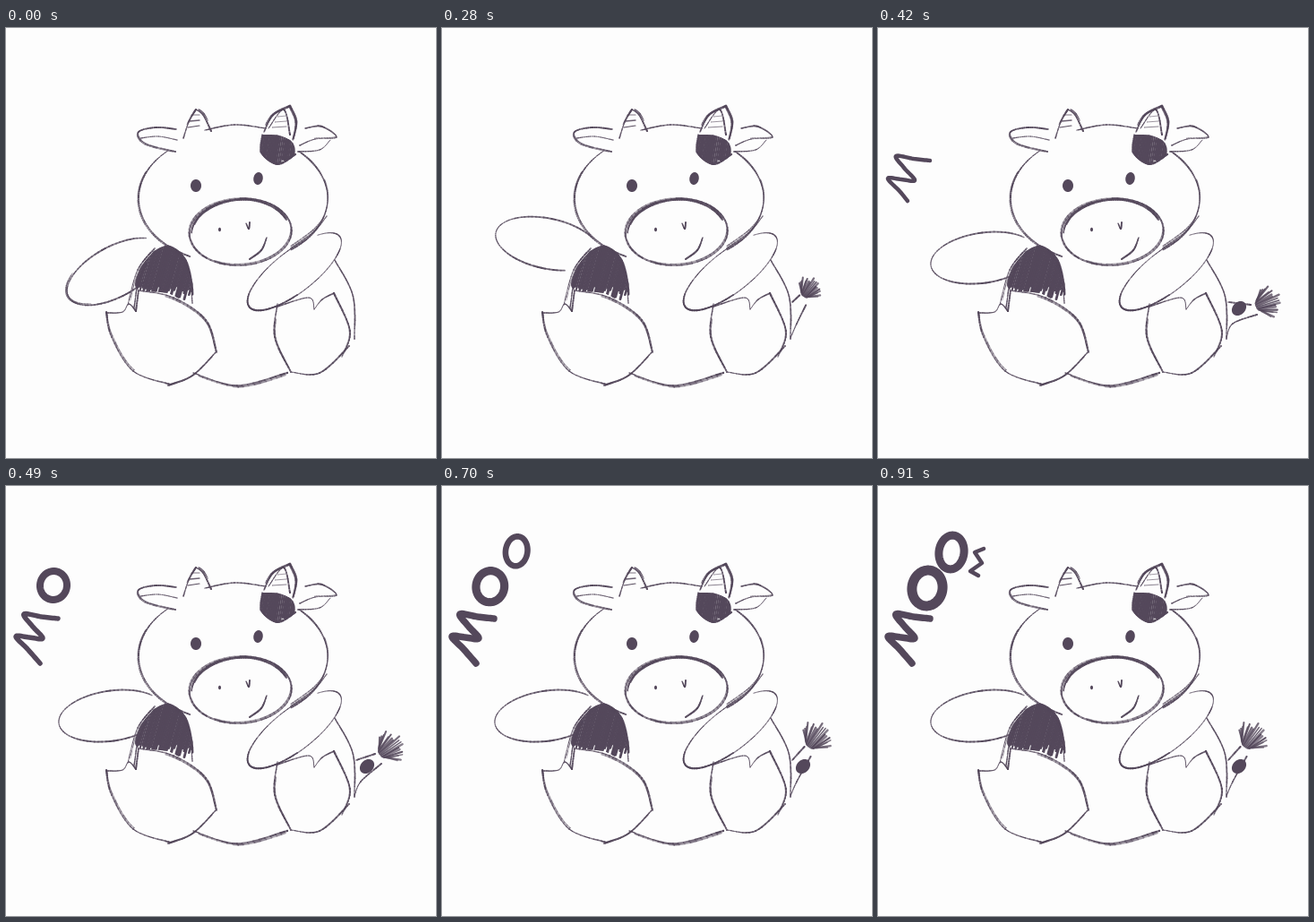
An HTML page with a canvas that plays this animation: 480x480 px, repeating every 0.98 s.

```html
<!DOCTYPE html>
<html lang="en">
<head>
<meta charset="utf-8">
<title>Cow doodle</title>
<style>
html, body { margin: 0; width: 100%; height: 100%; overflow: hidden; background: #fdfdfd; }
canvas { display: block; width: 480px; height: 480px; }
</style>
</head>
<body>
<canvas id="stage" width="480" height="480"></canvas>
<script>
const ctx = document.getElementById('stage').getContext('2d');
const STEP = 70, STEPS = 14, RAD = Math.PI / 180;
const PAPER = '#fdfdfd', INK = '#54485b';
ctx.lineCap = ctx.lineJoin = 'round';

let seed;
const random = () => (seed = seed * 16807 % 2147483647) / 2147483647;
const between = (a, b) => a + (b - a) * random();
const parse = s => s.split(' ').map(p => p.split(',').map(Number));

// Catmull-Rom samples through a few key points
function spline(path) {
  const pts = parse(path), out = [];
  const at = i => pts[Math.max(0, Math.min(pts.length - 1, i))];
  for (let i = 0; i < pts.length - 1; i++) {
    const [a, b, c, d] = [at(i - 1), at(i), at(i + 1), at(i + 2)];
    for (let t = 0; t < 1; t += 1 / 10) {
      out.push([0, 1].map(k => b[k] + t / 2 * (c[k] - a[k] +
        t * (2 * a[k] - 5 * b[k] + 4 * c[k] - d[k] + t * (3 * (b[k] - c[k]) + d[k] - a[k])))));
    }
  }
  return [...out, at(pts.length)];
}

// Samples along a tilted ellipse, angles in degrees
function arc(x, y, rx, ry, tilt = 0, from = 0, to = 360) {
  const c = Math.cos(tilt * RAD), s = Math.sin(tilt * RAD);
  return Array.from({ length: 61 }, (_, i) => {
    const a = (from + (to - from) * i / 60) * RAD;
    const u = rx * Math.cos(a), v = ry * Math.sin(a);
    return [x + u * c - v * s, y + u * s + v * c];
  });
}

// Grainy pencil line; each further pass retraces a stretch of it, a little off
function pencil(path, width = 1.5, passes = 2) {
  const pts = typeof path === 'string' ? spline(path) : path;
  ctx.strokeStyle = INK;
  for (let pass = 0; pass < passes; pass++) {
    const start = pass ? Math.floor(between(0, 0.4) * pts.length) : 0;
    const end = pass ? Math.floor(between(0.6, 1) * pts.length) : pts.length;
    const shift = pass ? [between(-1.6, 1.6), between(-1.6, 1.6)] : [0, 0];
    const phase = between(0, 6);
    for (let i = start + 1; i < end; i++) {
      ctx.globalAlpha = (pass ? 0.6 : 0.85) + between(-0.2, 0.15);
      ctx.lineWidth = width * (1 + 0.3 * Math.sin(phase + i * 0.15)) * (pass ? 0.8 : 1);
      ctx.beginPath();
      for (const [x, y] of [pts[i - 1], pts[i]]) ctx.lineTo(x + shift[0], y + shift[1]);
      ctx.stroke();
    }
  }
  ctx.globalAlpha = 1;
}

function trace(pts) {
  ctx.beginPath();
  pts.forEach(p => ctx.lineTo(...p));
}

function fill(pts, color = INK) {
  trace(pts);
  ctx.fillStyle = color;
  ctx.fill();
}

function marker(pts, width) {
  trace(pts);
  ctx.strokeStyle = INK;
  ctx.lineWidth = width;
  ctx.stroke();
}

// Shades a shape with slanted strokes that end unevenly towards the bottom
function shade(path, top, bottom, slant) {
  const pts = spline(path);
  const xs = pts.map(p => p[0]);
  const left = Math.min(...xs), right = Math.max(...xs);
  ctx.save();
  trace(pts);
  ctx.clip();
  for (let x = left; x < right + slant; x += 2) {
    const end = between(bottom - 18, bottom);
    marker([[x, top], [x - slant * (end - top) / (bottom - top), end]], between(2, 3.4));
  }
  ctx.restore();
}

function drawHead() {
  // ears
  pencil('190,113 168,111 148,116 156,129 189,138');
  pencil('150,123 170,121 191,125', 1.2, 1);
  pencil('334,112 352,110 369,122 345,124 328,131', 1.2);
  pencil('362,125 350,136 326,138', 1.2, 1);
  // horns
  pencil('198,123 204,105 212,91', 1.8);
  pencil('212,91 220,97 229,115');
  pencil('288,116 298,97 317,87', 2);
  pencil('317,87 324,104 321,123', 2);
  pencil('293,112 310,91 317,119');
  for (let i = 0; i < 3; i++) {
    pencil([[207 - i * 2, 97 + i * 7], [216, 97 + i * 6]], 1, 1);
    pencil([[303 - i * 3, 99 + i * 6], [313, 98 + i * 6]], 1, 1);
  }
  // spot
  shade('286,119 305,120 320,128 321,143 302,151 285,140 286,119', 114, 163, 8);
  pencil('286,119 285,139 303,152 323,141', 1.8);
  // outline
  pencil('222,114 255,108 290,112', 1.2, 1);
  pencil(arc(253, 190, 105, 73, 0, 226, 117));
  pencil(arc(253, 190, 106, 73, 0, -45, 52));
  // face
  fill(arc(212, 176, 6, 7));
  fill(arc(281.5, 168, 5.2, 7, 10));
  pencil(arc(262, 228, 57, 37, -3, 170, 530), 1.8);
  pencil(arc(262, 229, 55, 37, -3, 185, 340), 2);
  fill(arc(238.5, 225, 1.5, 2.2));
  pencil('268,218 271,224 272,217', 1.4, 1);
  pencil('291,234 285,248 272,258', 1.6, 1);
}

function drawBody() {
  // spot
  shade('165,249 183,243 203,262 208,306 180,296 146,291 150,268 165,249', 240, 306, 18);
  pencil('166,246 147,270 136,309');
  pencil('157,263 148,283 143,312');
  pencil('191,250 204,270 208,307');
  // near leg
  pencil('112,317 118,345 142,383 184,398', 1.7);
  pencil('181,399 208,388 235,361', 1.8);
  pencil('235,362 223,326 187,301 148,293', 1.7);
  pencil('148,293 145,316', 1.5, 1);
  pencil('145,316 137,308 130,317 112,318', 1.3, 1);
  // belly
  pencil('209,385 258,399 314,385', 1.8, 3);
  // far arm
  pencil(arc(322, 272, 64, 23, -38, 30, 300), 1.5, 3);
  pencil(arc(322, 272, 64, 23, -38, -45, 40), 1, 1);
  pencil('318,246 344,227 358,210', 1.5);
  // back and far leg
  pencil('367,259 387,298 389,347');
  pencil('303,308 300,345 318,384', 1.5);
  pencil('318,384 350,385 383,355', 1.4);
  pencil('375,367 384,338 366,296', 1.8);
  pencil('366,296 353,303 344,314', 1.3, 1);
  pencil('344,314 338,301 303,311', 1.3, 1);
}

// The arm waves up to the fourth step and settles halfway down
function drawArm(step) {
  const lift = Math.min(step, Math.max(2, 8 - step));
  const angle = -24 + 8.5 * lift;
  const x = 171 - 54 * Math.cos(angle * RAD), y = 250 - 54 * Math.sin(angle * RAD);
  pencil(arc(x, y, 59, 28, angle * 1.2, 65, 325), 1.5, step ? 1 : 3);
}

// The tail pops out, swings down until the sixth step and back up
function drawTail(step) {
  if (step < 3) return;
  const s = Math.min(step, 8);
  const swing = 1 - Math.abs(s - 6) / 2;
  const angle = (-54 + 33 * swing) * RAD;
  const reach = 52 * (1 - 0.5 ** (s - 2)), size = reach * 0.36;
  const x = 385 + reach * Math.cos(angle), y = 325 + reach * Math.sin(angle);
  const [baseX, baseY] = [x - size * 0.7 * Math.cos(angle), y - size * 0.7 * Math.sin(angle)];
  pencil(`389,346 396,330 ${baseX + 4},${baseY + 8}`, 1.5, 1);
  pencil(`391,306 ${baseX - 3},${baseY - 3}`, 1.5, 1);
  if (s > 4) fill(arc(403, 313, 9, 7, -45));
  // bristles fan out of the base of the tuft
  for (let i = -9; i <= 9; i++) {
    const fan = angle + i * 0.16;
    const far = size * between(0.7, 1.15), near = size * 0.5;
    pencil([
      [x - near * Math.cos(angle - i * 0.12), y - near * Math.sin(angle - i * 0.12)],
      [x + far * Math.cos(fan), y + far * Math.sin(fan)]
    ], 2, 1);
  }
}

// Letters appear one by one, then swell until the loop ends
function drawWord(step) {
  if (step < 6) return;
  const grow = Math.max(0, (step - 8) / 5);
  const drop = Math.min(step - 6, 1) * 5;
  marker(spline(`58,148 40,146 20,143 29,156 41,170 26,169 11,168 24,182 ${33 + drop},${193 + drop}`),
    Math.min(7.5, 4.5 + (step - 6)));
  if (step > 6) marker(arc(53 + grow * 2, 111 + grow * 3, 15 + grow * 2, 16 + grow * 4, 10), 8 + grow * 3);
  if (step > 7) marker(arc(84 - grow * 2, 72 + grow * 2, 11 + grow * 3, 15 + grow * 4, 8), 5 + grow * 4);
  if (step > 11) marker(parse('118,70 108,74 116,86 103,95 112,100').slice(0, step * 2 - 21), 4.5);
}

function render() {
  const step = Math.floor(performance.now() / STEP) % STEPS;
  seed = 2024;
  fill(parse('0,0 480,0 480,480 0,480'), PAPER);
  drawBody();
  drawHead();
  drawArm(step);
  drawTail(step);
  drawWord(step);
  requestAnimationFrame(render);
}
render();
</script>
</body>
</html>
```
